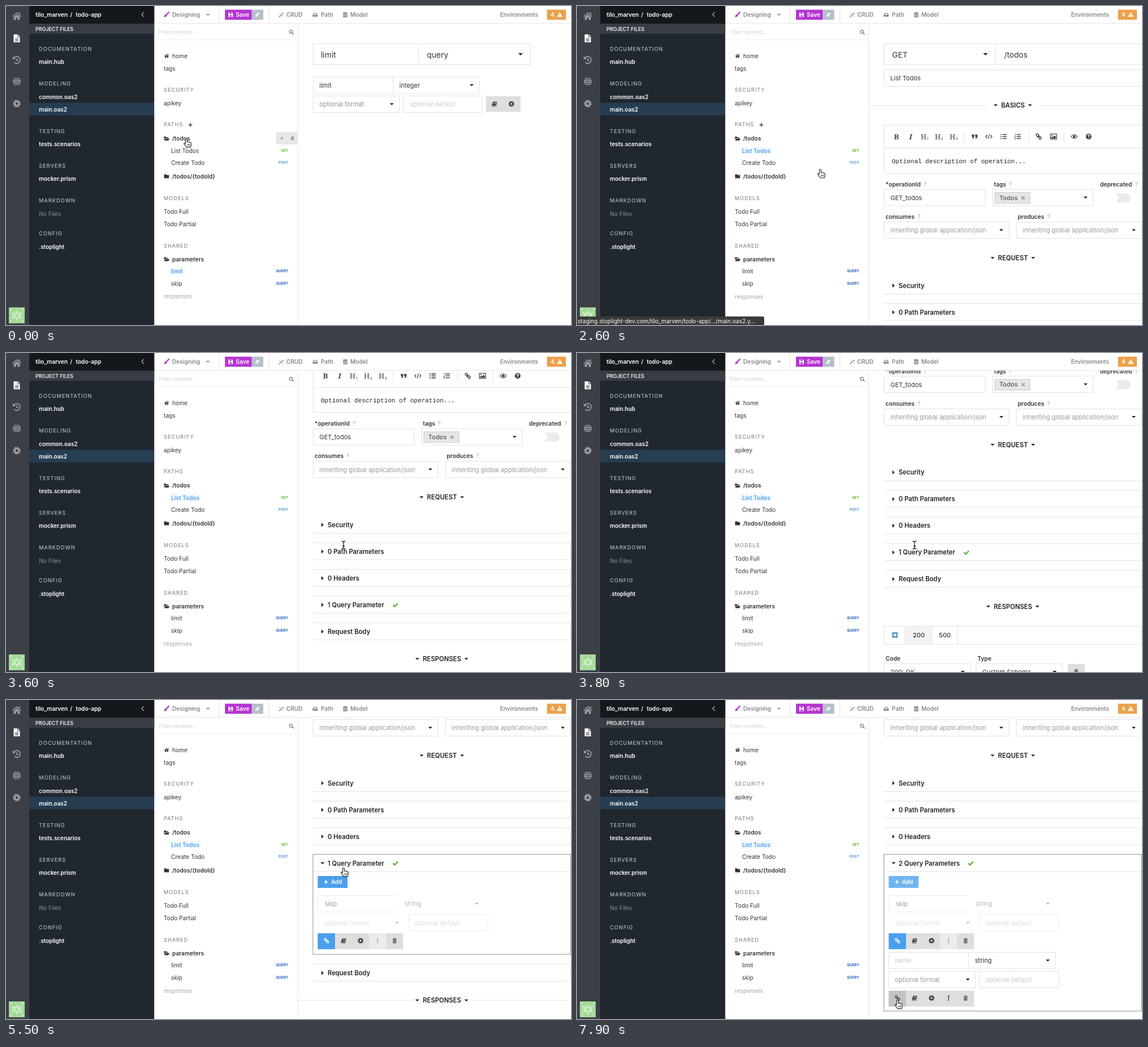
Animation of 996 by 562 pixels, one loop 8 s. Source, as an HTML page:

```html
<!DOCTYPE html>
<html lang="en">
<head>
<meta charset="utf-8">
<title>API designer</title>
<style>
html, body { margin: 0; width: 100%; height: 100%; overflow: hidden; background: #fff; }
svg { display: block; width: 100vw; height: 100vh; font-family: Inter, "Open Sans", sans-serif; }
.k { fill: none; stroke: currentColor; }
</style>
</head>
<body>
<svg id="stage" viewBox="0 0 996 562"></svg>
<script>
const LOOP = 8000;
const INK = '#2f343b', LINE = '#e2e2e2', DARK = '#8f8f8f', BLUE = '#4a9fec', RAIL = '#3d3f47';
const GREY = '#dedede', HINT = '#c9c9c9', PURPLE = '#b534d3', GLOW = '#f7fbfe';

// Drawing helpers; text is placed by its visual middle.
const text = (x, y, s, c = INK, size = 11, weight = 400, more = '') =>
  `<text x="${x}" y="${y + size * 0.365}" fill="${c}" font-size="${size}" font-weight="${weight}" ${more}>${s}</text>`;
const rect = (x1, y1, x2, y2, c, more = '') =>
  `<rect x="${x1}" y="${y1}" width="${x2 - x1}" height="${y2 - y1}" fill="${c}" ${more}/>`;
const box = (x1, y1, x2, y2, c = LINE, fill = '#fff') =>
  rect(x1 + .5, y1 + .5, x2 - .5, y2 - .5, fill, `stroke="${c}"`);
const path = (d, c, more = '') => `<path d="${d}" fill="none" stroke="${c}" ${more}/>`;
const hline = (x1, x2, y, c = LINE) => path(`M${x1} ${y + .5}H${x2}`, c);
const vline = (x, y1, y2, c = LINE) => path(`M${x + .5} ${y1}V${y2}`, c);
const down = (x, y, c = '#222', r = 4) => `<path d="M${x - r} ${y - r / 2}h${2 * r}l${-r} ${r}z" fill="${c}"/>`;
const right = (x, y) => `<path d="M${x - 2} ${y - 3.5}v7l4-3.5z" fill="#222"/>`;
const group = (id, body, more = '') => `<g id="${id}" ${more}>${body}</g>`;
const caps = (x, y, s, c) => text(x, y, s, c, 9.2, 400, 'letter-spacing="1"');

const ICONS = {
  home: '<path d="M0-7L8 .3L7 1.4L0-5L-7 1.4L-8 .3zM3.6-6.5h2.2v4l-2.2-2zM-5.3 1.5L0-3.2L5.3 1.5V6.5H1.5V2.5H-1.5V6.5H-5.3z"/>',
  doc: `<path d="M-5.5-7H1.2V-2.3H5.5V7H-5.5zM2.2-7L5.5-3.3H2.2z"/><path d="M-3 .3H3M-3 2.5H3M-3 4.7H3" stroke="${RAIL}"/>`,
  history: '<path class="k" stroke-width="1.7" d="M-5-3.2A6 6 0 1 1-4.4 4.2M0-3V.8H3"/><path d="M-7.2-6.5V-1.2H-2z"/>',
  globe: `<circle r="7"/><g fill="none" stroke="${RAIL}" stroke-width=".8"><ellipse rx="3.4" ry="7"/><path d="M0-7V7M-7 0H7M-6-3.5H6M-6 3.5H6"/></g>`,
  gear: '<circle class="k" r="3.8" stroke-width="3.2"/><circle class="k" r="5.8" stroke-width="2.2" stroke-dasharray="2.278"/>',
  chevron: '<path class="k" stroke-width="1.3" d="M2-4L-2 0L2 4"/>',
  brush: '<path class="k" stroke-width="2.3" stroke-linecap="round" d="M4-4L.3-.2"/><path d="M-1 0q3 1 1.2 3.3q-2 1.6-5.2 1q1.3-.8 1.3-2.3q.4-2 2.7-2z"/>',
  floppy: `<path d="M-4-4H2.5L4-2.5V4H-4z"/><path d="M-2-4h3.5v2.5h-3.5zM-2.3 1h4.6v2.2h-4.6z" fill="${PURPLE}"/>`,
  eraser: '<path d="M-1-3.5H5L1 3.5H-5zM-3.5 1.7H.7"/><path d="M-2.7.3H1.8" stroke="#b5bfca"/>',
  wand: '<path class="k" stroke-width="1.8" d="M-4 4.5L2.6-2.2"/><path d="M2-4.5l1.5 1.5 1.5-1.5v4l-2-2zM-3-4h1.5v1.5h-1.5zM3 1.5h1.5v1.5h-1.5z"/>',
  drive: '<path d="M-2.5-3.5h5L5 .5V3.5H-5V.5z"/><path d="M-1.7-2.2h3.4L3 .3H-3z" fill="#fff"/>',
  db: '<path d="M-4-3q0-1.5 4-1.5t4 1.5v6q0 1.5-4 1.5t-4-1.5z"/><path d="M-4-1.5q4 2 8 0M-4 1.3q4 2 8 0" fill="none" stroke="#fff" stroke-width=".9"/>',
  warn: '<path d="M0-4.5L5 4.2H-5z"/><path d="M0-1.7V1.3M0 2.2V3.3" stroke="#eca04a" stroke-width="1.2"/>',
  search: '<circle class="k" cx="-.7" cy="-.7" r="2.7" stroke-width="1.2"/><path class="k" stroke-width="1.5" d="M1.3 1.3L4 4"/>',
  folder: '<path d="M-4.3-3.5H-1l1 1.2H4.3V3.5H-4.3z"/>',
  open: '<path d="M-4.5 2V-3.5H-1.5l1 1.2H3V-.8H-2.6zM-2.2 0H5.3L3.3 3.5H-4.3z"/>',
  plus: '<path class="k" stroke-width="1.6" d="M-3.5 0H3.5M0-3.5V3.5"/>',
  trash: '<path d="M-4-4H-1.5V-5H1.5V-4H4V-2.8H-4zM-3.3-2H3.3V5H-3.3z"/><path d="M-1.3-.8V3.8M1.3-.8V3.8" stroke="#ddd" stroke-width=".9"/>',
  book: '<path d="M-2.5-4.5H5L2.7 3.2H-4.2Q-5 4.4-3.5 4.4H3L5.3-2.8V-1L3.3 5.2H-4Q-6 4.5-5 2z"/><path d="M-.8-2.5H3M-1.3-.7H2.5" stroke="#ddd" stroke-width=".8"/>',
  link: '<g class="k" stroke-width="1.5" transform="rotate(45)"><rect x="-5.5" y="-1.9" width="5" height="3.8" rx="1.8"/><rect x=".5" y="-1.9" width="5" height="3.8" rx="1.8"/><path d="M-2 0H2"/></g>',
  bang: '<path d="M-1.1-4.5H1.1L.7 1.3H-.7z"/><circle cy="3.5" r="1.2"/>',
  quote: '<path d="M-5-3.5H-.8V.5Q-1 3.5-4.3 3.8V2.3Q-3 2-3 .5H-5zM.8-3.5H5V.5Q4.8 3.5 1.5 3.8V2.3Q2.8 2 2.8.5H.8z"/>',
  code: '<path class="k" stroke-width="1.2" d="M-3-3L-5.5 0L-3 3M3-3L5.5 0L3 3M1-4L-1 4"/>',
  ul: '<path class="k" stroke-width="1.7" d="M-5.5-3.5h2M-5.5 0h2M-5.5 3.5h2M-2-3.5H5.5M-2 0H5.5M-2 3.5H5.5"/>',
  ol: '<path class="k" stroke-width="1.5" d="M-2-3.5H5.5M-2 0H5.5M-2 3.5H5.5"/><path class="k" d="M-4.3-5v3.5M-5.5.3h1.6l-1.6 1.7h2M-5.5 4.3h2"/>',
  image: '<rect class="k" x="-5.5" y="-4.5" width="11" height="9" stroke-width="1.2"/><path d="M-4.3 3.3V1.5L-2.5-.3L-1 1L1.8-2L4.3.6V3.3z"/><circle cx="-2.7" cy="-2" r="1"/>',
  eye: '<path class="k" stroke-width="1.1" d="M-5.5 0Q0-7 5.5 0Q0 7-5.5 0z"/><circle r="2.3"/>',
  help: '<circle r="5"/><path d="M-1.5-1.3Q-1.2-2.9.2-2.8Q1.8-2.5 1.5-1.2Q.1 0 0 1M0 2V3.2" fill="none" stroke="#fff" stroke-width="1.3"/>',
  check: '<path class="k" stroke-width="2.3" d="M-4.3 0L-1.3 3L4.3-2.8"/>',
  cross: '<path class="k" stroke-width="1.7" d="M-2.6-2.6L2.6 2.6M2.6-2.6L-2.6 2.6"/>',
  add: '<rect x="-5" y="-5" width="10" height="10" rx="1.5"/><path d="M-3 0H3M0-3V3" stroke="#fff" stroke-width="1.7"/>'
};
const icon = (name, x, y, c = '#444', s = 1) =>
  `<g transform="translate(${x} ${y}) scale(${s})" color="${c}" fill="currentColor">${ICONS[name]}</g>`;

function rail() {
  const spots = [['home', 18], ['doc', 57], ['history', 95], ['globe', 133], ['gear', 172]];
  return rect(0, 0, 41, 562, RAIL) +
    spots.map(([n, y]) => icon(n, 19, y, n === 'doc' ? '#fff' : '#9c9ea3')).join('') +
    rect(5, 531, 33, 559, '#a3d998') +
    '<path d="M19 535l3 6 7-3-3 7 3 7-7-3-3 6-3-6-7 3 3-7-3-7 7 3z" fill="#c9eac2"/>' +
    [[7, 533], [28, 533], [7, 554], [28, 554]].map(([x, y]) => rect(x, y, x + 3, y + 3, '#c6e9be')).join('') +
    '<circle cx="19" cy="545" r="2.5" fill="#a3d998"/>';
}

function files() {
  const heads = [[76, 'DOCUMENTATION'], [137, 'MODELING'], [220.5, 'TESTING'], [282, 'SERVERS'], [343, 'MARKDOWN'], [401, 'CONFIG']];
  const names = [[98.5, 'main.hub'], [160, 'common.oas2'], [182, 'main.oas2'], [243.5, 'tests.scenarios'], [304.5, 'mocker.prism'], [424.5, '.stoplight']];
  const top = (x, s) => text(x, 15, s, '#fff', 10.1, 600);
  return rect(41, 0, 261.3, 562, '#21272f') + rect(41, 0, 261.3, 31, '#14171b') + rect(41, 31, 261.3, 49, '#383d44') +
    top(52, 'tilo_marven') + top(113, '/') + top(123, 'todo-app') + icon('chevron', 241, 15, '#a5a8ad') +
    text(52, 41, 'PROJECT FILES', '#f2f2f2', 8.8, 600) + rect(41, 170.5, 261, 192.5, '#263d52') +
    heads.map(([y, s]) => caps(58, y, s, '#cfd2d6')).join('') +
    names.map(([y, s]) => text(58, y, s, '#fff', 9.9, 600)).join('') +
    text(58, 366.5, 'No Files', '#8b9097', 10.2);
}

function toolbar() {
  const c = '#85878d', label = (x, s, k = c) => text(x, 15.5, s, k, 10.1, 600);
  return rect(261, 0, 996, 31, '#fff') + hline(261, 996, 30, '#e6e6e6') + vline(375, 0, 30) + vline(463, 0, 30) +
    icon('brush', 283, 15, PURPLE) + label(293, 'Designing') + down(356, 15.5, '#999', 3.5) +
    rect(386, 6.5, 433.5, 24.3, PURPLE) + icon('floppy', 396, 15.5, '#fff') + label(405, 'Save', '#fff') +
    rect(433.5, 6.5, 453.5, 24.3, '#b5bfca') + icon('eraser', 443, 15.5, '#fff', .85) +
    icon('wand', 485, 15.5, c, .9) + label(494, 'CRUD') + icon('drive', 545, 15.5, c, .9) + label(555, 'Path') +
    icon('db', 598, 15.5, c) + label(607, 'Model') + label(871, 'Environments') +
    rect(953.7, 6.5, 987, 24.3, '#eca04a') + label(960, '4', '#fff') + icon('warn', 976, 15, '#fff');
}

function contents() {
  const item = (x, y, s) => text(x, y, s, INK, 10.2);
  const folder = (y, s, n) => icon(n, 283, y, INK) + text(293, y, s, INK, 10.1, 600);
  const badge = (y, s, c) => text(497.5, y, s, c, 6.2, 700, 'text-anchor="end"');
  const heads = [[148, 'SECURITY'], [209, 'PATHS'], [339, 'MODELS'], [423, 'SHARED']];
  const items = [[293, 88, 'home'], [278, 110, 'tags'], [278, 171, 'apikey'], [291, 276.5, 'Create Todo'],
    [278, 362, 'Todo Full'], [278, 384, 'Todo Partial'], [291, 489, 'skip']];
  return rect(261, 31, 515, 562, '#fff') + vline(514, 31, 562, '#e6e6e6') + hline(261, 514, 59, '#efefef') +
    text(269.5, 45.5, 'Filter contents…', '#cfcfcf', 8.8) + icon('search', 503, 46, '#777') +
    icon('home', 283, 88, INK, .55) + heads.map(([y, s]) => caps(278, y, s, '#777')).join('') +
    items.map(i => item(...i)).join('') +
    folder(233.5, '/todos', 'open') + folder(300, '/todos/{todoId}', 'folder') + folder(446, 'parameters', 'open') +
    rect(288, 247, 344, 263, GLOW, 'id="listGlow"') + text(291, 255, 'List Todos', INK, 10.1, 400, 'id="list"') +
    rect(288, 459, 316, 476, GLOW, 'id="limitGlow"') + text(291, 467.5, 'limit', INK, 10.1, 400, 'id="limit"') +
    badge(254.5, 'GET', '#62b52c') + badge(276, 'POST', '#4f93d8') +
    badge(467, 'QUERY', '#2d5cb8') + badge(489, 'QUERY', '#2d5cb8') +
    group('responses', text(278, 511.5, 'responses', '#a5a5a5', 10.2)) +
    group('pathPlus', icon('plus', 325, 209.5, '#444', .95)) +
    group('todosTools', rect(476, 222, 514, 244, '#e8e8e8') + icon('plus', 486, 233, '#888', .7) + icon('trash', 505, 233, '#888', .65)) +
    group('listTools', rect(495, 244, 514, 266, '#e8e8e8') + icon('trash', 505, 255, '#888', .65));
}

const field = (x1, y1, x2, s, c = INK, edge = LINE) => box(x1, y1, x2, y1 + 30, edge) + text(x1 + 11.5, y1 + 15.2, s, c);
const select = (x1, y1, x2, s, c = INK) => field(x1, y1, x2, s, c) + down(x2 - 14, y1 + 15, '#222', 3.5);

function limitView() {
  return box(541, 66, 925, 104) + vline(727, 66, 104) + text(555, 85.5, 'limit', INK, 13.9) +
    text(742, 85.5, 'query', INK, 13.8) + down(907, 85) +
    field(541, 124.5, 683, 'limit') + select(682, 124.5, 835, 'integer') +
    select(541, 158, 694, 'optional format', '#8e8e8e') + field(700, 158, 840, 'optional default', HINT) +
    rect(846, 159, 907, 186.5, GREY) + icon('book', 861, 172.5, '#444', .9) + icon('gear', 891, 172.5, '#444', .75);
}

function editor(y) {
  const mark = (x, s, more) => text(x, y + 21, s, '#444', 13, 700, `font-family="Noto Serif, serif" text-anchor="middle" ${more}`);
  const tools = [['quote', 701], ['code', 726], ['ul', 752], ['ol', 777], ['link', 814], ['image', 840], ['eye', 876.5], ['help', 902]];
  return box(541, y, 1000, y + 86) + hline(541, 996, y + 41) + mark(563, 'B', '') + mark(588, 'I', 'font-style="italic"') +
    [613, 638, 664].map((x, i) => text(x - 7, y + 21, 'H', '#444', 12.5, 400, 'font-family="Noto Serif, serif"') +
      text(x + 3.5, y + 25, i + 1, '#444', 6.5)).join('') +
    [682, 796, 858].map(x => vline(x, y + 12, y + 31)).join('') +
    tools.map(([n, x]) => icon(n, x, y + 21)).join('') +
    text(555, y + 64, 'Optional description of operation...', '#222', 10.95, 400, 'font-family="Liberation Mono, monospace"');
}

const section = (y, s, half) => text(768.5, y, s, '#222', 11.3, 600, 'text-anchor="middle"') +
  down(768 - half, y, '#222', 3.5) + down(768 + half + .5, y, '#222', 3.5);
const rowEdge = (y, id = '') => path(`M541 ${y}H995.5V${y + 30}H541`, LINE, id && `id="${id}"`);
const rowText = (y, s) => text(567, y + 15.5, s, '#222', 11.2, 600);
const row = (y, s, id) => rowEdge(y, id) + right(558, y + 15.5) + rowText(y, s);

function toolStrip(y, linkFill, linkInk, bangFill, bangInk, id = '') {
  return rect(549.5, y, 700, y + 28, GREY) + rect(549.5, y, 580, y + 28, linkFill, id && `id="${id}"`) +
    rect(640, y, 670, y + 28, bangFill) + icon('link', 565, y + 13, linkInk, .9) + icon('book', 595, y + 13, '#444', .9) +
    icon('gear', 625, y + 13, '#444', .75) + icon('bang', 655, y + 13, bangInk) + icon('trash', 685, y + 13, '#555', .9);
}

function firstParam() {
  return path('M690 690.5H549.5V719.5H690', '#ececec') + text(562, 705, 'skip', '#9c9c9c') +
    text(702.5, 705, 'string', '#b5b5b5') + down(830, 705, '#bbb', 3.5) +
    text(561.5, 738.5, 'optional format', '#e0e0e0') + down(689, 738.5, '#c4c4c4', 3.5) +
    field(709, 723.5, 850, 'optional default', '#dcdcdc', '#ededed') +
    toolStrip(757, BLUE, '#fff', '#ececec', '#aaa');
}

function secondParam() {
  return field(549, 790, 691, 'name', HINT) + select(690, 790, 844, 'string') +
    select(549, 823.5, 703, 'optional format', '#999') + field(709, 823.5, 850, 'optional default', HINT) +
    toolStrip(858, GREY, '#444', GREY, '#444', 'linkBtn');
}

function operationView() {
  const label = (x, y, s, q) => text(x, y, s, '#333', 10.2, 600) + (q ? text(q, y, '?', '#b5b5b5', 10, 500) : '');
  const inherit = 'inheriting global application/json';
  const queryHead = (s, x) => rowText(618, s) + icon('check', x, 633.5, '#5cb335');
  return box(541, 66, 1000, 104) + vline(737, 66, 104) + text(555.5, 85.5, 'GET', INK, 13.7) + down(720, 85) +
    text(753, 86, '/todos', INK, 13.7) + field(541, 112, 1000, 'List Todos') +
    hline(515, 723, 175) + hline(813, 996, 175) + section(175, 'BASICS', 30) + editor(209) +
    label(544, 314, '*operationId', 611) + label(735, 314, 'tags', 761) + label(922, 314, 'deprecated', 984) +
    field(541, 322.5, 720, 'GET_todos') + select(732, 322.5, 910.5, '') +
    box(736, 328, 799, 348, '#cbcbcb', '#e6e6e6') + text(744.5, 337.5, 'Todos', '#555', 11, 500) + icon('cross', 786.5, 338, '#999') +
    rect(939, 330, 976, 346, '#ebebeb', 'rx="8"') + '<circle cx="946" cy="338" r="8" fill="#fff"/>' +
    label(544, 371, 'consumes', 600) + label(777, 371, 'produces', 829) +
    select(541, 380, 762, inherit, '#999') + select(774, 380, 995.5, inherit, '#999') +
    section(444, 'REQUEST', 35.5) +
    hline(541, 996, 507) + right(558, 492.5) + rowText(477, 'Security') +
    row(524, '0 Path Parameters') + row(571, '0 Headers') +
    group('queryClosed', rowEdge(618, 'queryEdge') + right(558, 633.5)) +
    group('queryOpen', rect(541, 618, 995.5, 794, '#fff', `stroke="${DARK}" id="queryBox"`) +
      hline(542, 995, 648) + down(558, 633.5, '#222', 3.5) +
      group('addBtn', rect(549.5, 656, 602, 677, BLUE) + icon('plus', 564, 666.5, '#fff') + text(573, 666.5, 'Add', '#fff', 10, 600)) +
      firstParam()) +
    group('second', secondParam()) +
    group('oneParam', queryHead('1 Query Parameter', 686.5)) + group('twoParams', queryHead('2 Query Parameters', 694)) +
    group('tail', row(665, 'Request Body', 'bodyEdge') +
      group('tailLine', hline(515, 718, 728) + hline(820, 996, 728)) + section(728.8, 'RESPONSES', 43) +
      box(541, 763, 996, 796) + rect(579, 764, 625, 795, '#f3f3f3') + [578, 625, 670].map(x => vline(x, 763, 796)).join('') +
      icon('add', 560.5, 779, '#5299d3') + text(592, 779.5, '200', INK, 11, 500) + text(638, 779.5, '500', INK, 11, 500) +
      label(544, 820, 'Code') + label(706, 820, 'Type') + select(541, 829, 694, '200: OK') + select(703, 829, 856, 'Custom Schema') +
      rect(865, 830, 895, 858, GREY) + icon('trash', 880, 843.5, '#555', .9) + editor(876));
}

const hand = '<path d="M-1.6 1.2a1.5 1.5 0 0 1 3 0V5.5q2-1 2.6.3q1.8-.6 2.3.7q2-.3 2 1.6v3.2q0 2-1 3.6H.3Q-1.8 12-4 9.2q-.7-1.6.6-2q1-.1 1.8 1.1z" fill="#fff" stroke="#222" stroke-width="1.1"/>' +
  path('M2 9V12.5M4 9V12.5M6 9V12.5', '#333', 'stroke-width=".9"');
const beam = path('M-3.5-6.5Q0-6.5 0-4.5V5Q0 7-3.5 7M3.5-6.5Q0-6.5 0-4.5V5Q0 7 3.5 7M-2 2H2', '#222', 'stroke-width="1.3"');

document.getElementById('stage').innerHTML =
  '<clipPath id="pane"><rect x="515" y="31" width="481" height="531"/></clipPath>' + rect(0, 0, 996, 562, '#fff') +
  `<g clip-path="url(#pane)">${group('limitView', limitView())}${group('opView', operationView())}</g>` +
  contents() + toolbar() + files() + rail() +
  group('status', '<path d="M0 547H327q3 0 3 3V562H0z" fill="#3b3b3b"/>' +
    text(1, 555.5, 'staging.stoplight-dev.com/tilo_marven/todo-app/…/main.oas2.y…', '#fff', 10.15)) +
  group('cursor', group('hand', hand) + group('beam', beam));

// Cursor stops: time, x, y of the hot spot.
const STOPS = [[0, 318, 234], [250, 318, 234], [700, 320, 255], [2300, 320, 255], [3000, 595, 338], [4600, 595, 338],
  [5000, 595, 296], [5700, 595, 296], [6200, 578, 320], [6800, 578, 320], [7500, 565, 529], [LOOP, 565, 529]];
const SWITCH = 2200, SCROLL_END = 4250, EXPAND = 5200, ADD = 6600;

const clamp = v => Math.max(0, Math.min(1, v));
function cursorAt(t) {
  const i = STOPS.findIndex(s => s[0] > t), [t0, x0, y0] = STOPS[i - 1], [t1, x1, y1] = STOPS[i];
  const p = (t - t0) / (t1 - t0), e = p * p * (3 - 2 * p);
  return [x0 + (x1 - x0) * e, y0 + (y1 - y0) * e];
}
const el = id => document.getElementById(id);
const show = (id, on) => el(id).style.display = on ? '' : 'none';
const set = (id, name, v) => el(id).setAttribute(name, v);
const move = (id, x, y) => set(id, 'transform', `translate(${x} ${y})`);

function draw(t) {
  const [x, y] = cursorAt(t);
  const loaded = t >= SWITCH, open = t >= EXPAND, two = t >= ADD;
  const inList = x < 515, onTodos = inList && y < 244, onList = inList && y >= 244 && y < 266;
  const scroll = 346 * (1 - (1 - clamp((t - 3350) / 900)) ** 2.43);

  show('limitView', !loaded);
  show('opView', loaded);
  move('opView', 0, -scroll);
  show('limitGlow', !loaded);
  set('limit', 'fill', loaded ? INK : BLUE);
  set('limit', 'font-weight', loaded ? 400 : 600);
  show('listGlow', loaded || onList);
  set('list', 'fill', loaded || onList ? BLUE : INK);
  set('list', 'font-weight', loaded ? 600 : 400);
  show('todosTools', onTodos);
  show('listTools', onList);
  show('pathPlus', inList);
  move('responses', 0, loaded ? 1 : 0);
  set('status', 'opacity', t < 700 ? 0 : clamp((2800 - t) / 200));

  const settled = t >= SCROLL_END;
  set('bodyEdge', 'stroke', settled && !open && y > 319 ? DARK : LINE);
  set('queryEdge', 'stroke', settled && y < 303 ? DARK : LINE);
  show('queryClosed', !open);
  show('queryOpen', open);
  show('second', two);
  show('oneParam', !two);
  show('twoParams', two);
  show('tailLine', open);
  set('queryBox', 'height', two ? 276 : 176);
  move('tail', 0, two ? 247 : open ? 146.5 : 0);
  set('addBtn', 'opacity', 1 - .22 * clamp((t - 6050) / 150));
  set('linkBtn', 'fill', y >= 512 ? '#c3c3c3' : GREY);

  const typing = (!inList && !settled) || (two && y > 344 && y < 508);
  show('hand', !typing);
  show('beam', typing);
  move('cursor', x, y);
}

function tick() {
  draw(performance.now() % LOOP);
  requestAnimationFrame(tick);
}
tick();
</script>
</body>
</html>
```
